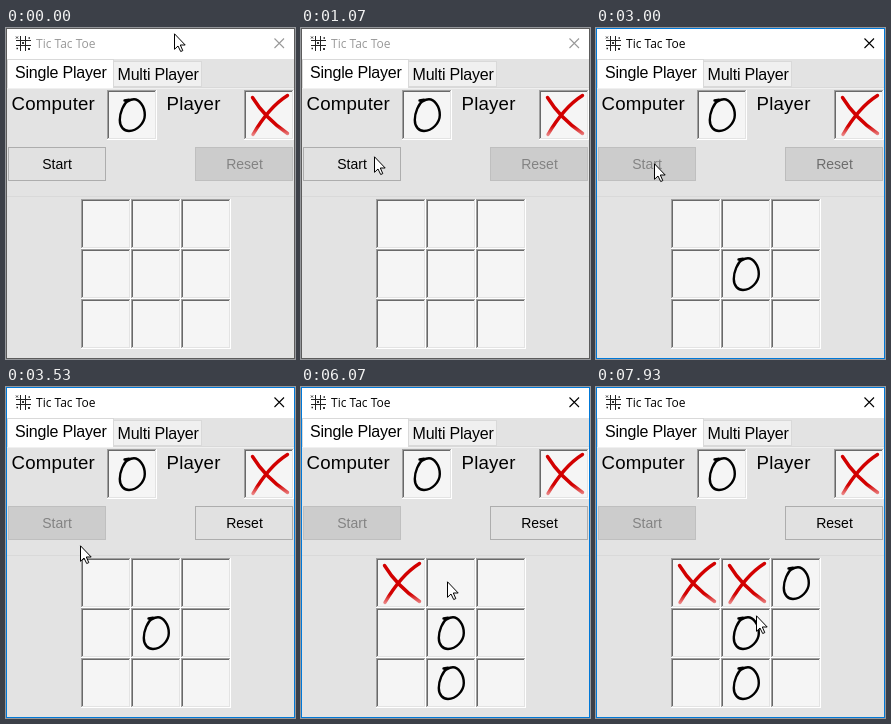
An HTML page for the animation above (8000 ms loop, 289 by 331 pixels).

```html
<!DOCTYPE html>
<html lang="en">
<head>
<meta charset="utf-8">
<title>Tic Tac Toe</title>
<style>
html, body { margin: 0; width: 100%; height: 100%; overflow: hidden; background: #e3e3e3; }
svg { display: block; width: 100%; height: 100%; }
text { font-family: "Liberation Sans", Arial, sans-serif; fill: #000; }
.title { font: 12px "Open Sans", sans-serif; }
.tab { font-size: 16px; letter-spacing: -.2px; }
.label { font-size: 18.67px; letter-spacing: .2px; }
.btn { font-size: 14px; text-anchor: middle; }
.edge { stroke: #d9d9d9; }
</style>
</head>
<body>
<svg viewBox="0 0 289 331">
  <defs>
    <linearGradient id="brush" gradientUnits="userSpaceOnUse" x1="0" y1="36" x2="0" y2="47">
      <stop stop-color="#d20000"/>
      <stop offset="1" stop-color="#f0a0a0"/>
    </linearGradient>
    <g id="box">
      <path d="M0 0H50V50H0Z" fill="#fff"/>
      <path d="M0 0H49V49H0Z" fill="#a0a0a0"/>
      <path d="M1 1H49V49H1Z" fill="#e3e3e3"/>
      <path d="M1 1H48V48H1Z" fill="#696969"/>
      <path d="M2 2H48V48H2Z" fill="#f5f5f5"/>
    </g>
    <path id="o" d="M17.5 10.5L22 9.8C16 14 12.8 23 12.8 30C12.8 37 17 41 22 41C30 41 37.8 33 37.8 25C37.8 16 32 9.3 27 9.3C24.5 9.3 22.5 10.3 20.5 11.5"
      fill="none" stroke="#000" stroke-width="2.4" stroke-linecap="round" stroke-linejoin="round"/>
    <g id="x" fill="none" stroke="url(#brush)" stroke-width="3.4" stroke-linecap="round">
      <path d="M8.5 7.5Q21 28 43.5 43.5"/>
      <path d="M43.5 5.5Q25 17 9 44.5"/>
    </g>
  </defs>

  <rect width="289" height="331" fill="#e3e3e3"/>
  <rect width="289" height="31" fill="#fff"/>
  <g fill="none" stroke="#222">
    <path d="M14.5 8V23M19.5 8V23M10 12.5H25M10 17.5H25"/>
    <path d="M10 8.5l2 2m0-2l-2 2M16 14l2 2m0-2l-2 2M22 20l2 2m0-2l-2 2" stroke-width=".9"/>
    <path d="M10.5 20.5h1.5M22.5 10h1.5" stroke-width="1.5"/>
  </g>
  <text id="title" class="title" x="30" y="20">Tic Tac Toe</text>
  <path id="close" d="M268.5 10.5l9.5 9.5m0-9.5l-9.5 9.5" fill="none" stroke-width="1.1"/>

  <path class="edge" d="M1 59.5H288M1 168.5H288"/>
  <path d="M1 60.5H288" stroke="#f0f0f0"/>
  <rect class="edge" x="107.5" y="33.5" width="88" height="25" fill="#f0f0f0"/>
  <rect class="edge" x="1.5" y="31.5" width="106" height="28" fill="#fff"/>
  <path d="M2 59.5H107" stroke="#fff"/>
  <text class="tab" x="9" y="50">Single Player</text>
  <text class="tab" x="111.5" y="52">Multi Player</text>
  <text class="label" x="5.5" y="82">Computer</text>
  <text class="label" x="160.5" y="82">Player</text>

  <g id="start"><rect x="2.5" y="119.5" width="97" height="33"/><text class="btn" x="51" y="141">Start</text></g>
  <g id="reset"><rect x="189.5" y="119.5" width="97" height="33"/><text class="btn" x="238.5" y="141">Reset</text></g>
  <g id="board"></g>
  <rect id="frame" x=".5" y=".5" width="288" height="330" fill="none"/>
  <path id="cursor" d="M.5 .8V16.3L4 13L6.7 18.5L8.8 17.6L6.3 12H11.2Z" fill="#fff" stroke="#000"/>
</svg>
<script>
const LOOP = 8000, FPS = 15;
const FOCUS = 29;  // tick at which Start is pressed
const THINK = 14;  // ticks the computer takes to answer
const $ = id => document.getElementById(id);
const clamp = v => Math.max(0, Math.min(1, v));
const set = (el, attrs) => { for (const k in attrs) el.setAttribute(k, attrs[k]); };

function use(name, x, y) {
  const el = document.createElementNS("http://www.w3.org/2000/svg", "use");
  set(el, { href: "#" + name, x, y });
  return $("board").appendChild(el);
}

const inCell = (name, c, r) => use(name, 75 + c * 50, 171 + r * 50);

for (const [mark, x] of [["o", 101], ["x", 238]]) {
  use("box", x, 62);
  use(mark, x, 62);
}
for (let i = 0; i < 9; i++) inCell("box", i % 3, Math.floor(i / 3));

const moves = [];
const play = (mark, c, r, at) => moves.push({ el: inCell(mark, c, r), at });
const click1 = 62, click2 = 101;
play("o", 1, 1, FOCUS + 2 + THINK);
play("x", 0, 0, click1);
play("o", 1, 2, click1 + THINK);
play("x", 1, 0, click2);
play("o", 2, 0, click2 + THINK);

// Cursor strokes: first tick, last tick, where it arrives
const strokes = [
  [7, 9, 183, 24], [9, 16, 73, 128], [16, 20, 58, 135], [51, 57, 100, 195],
  [68, 73, 113, 195], [73, 76, 139, 194], [90, 93, 157, 193], [113, 119, 160, 228]
];

function cursorAt(n) {
  let x = 168, y = 5;
  for (const [from, to, tx, ty] of strokes) {
    const k = 1 - (1 - clamp((n - from) / (to - from))) ** 1.2;
    x += (tx - x) * k;
    y += (ty - y) * k;
  }
  return [Math.round(x), Math.round(y)];
}

// Button looks: fill, border, text
const gray = v => [v, v, v];
const NORMAL = [gray(225), gray(173), gray(0)];
const HOVER = [[229, 241, 251], [0, 120, 215], gray(0)];
const OFF = [gray(204), gray(191), gray(131)];

function paint(button, from, to, k) {
  const [fill, stroke, ink] = from.map((c, i) =>
    `rgb(${c.map((v, j) => Math.round(v + (to[i][j] - v) * clamp(k)))})`);
  set(button.firstChild, { fill, stroke });
  button.lastChild.style.fill = ink;
}

function render(t) {
  const n = Math.floor((t + 5) * FPS / 1000);
  const active = n >= FOCUS;
  const ink = active ? "#000" : "#999";
  set($("frame"), { stroke: active ? "#0078d7" : "#5c5c5c" });
  set($("close"), { stroke: ink });
  $("title").style.fill = ink;

  if (active) paint($("start"), HOVER, OFF, (n - FOCUS) / 3);
  else paint($("start"), NORMAL, HOVER, (n - 16) / 4);
  paint($("reset"), OFF, NORMAL, (n - FOCUS - 15) / 6);

  for (const m of moves) set(m.el, { visibility: n >= m.at ? "visible" : "hidden" });
  set($("cursor"), { transform: `translate(${cursorAt(n)})` });
}

function tick() {
  render(performance.now() % LOOP);
  requestAnimationFrame(tick);
}
tick();
</script>
</body>
</html>
```
